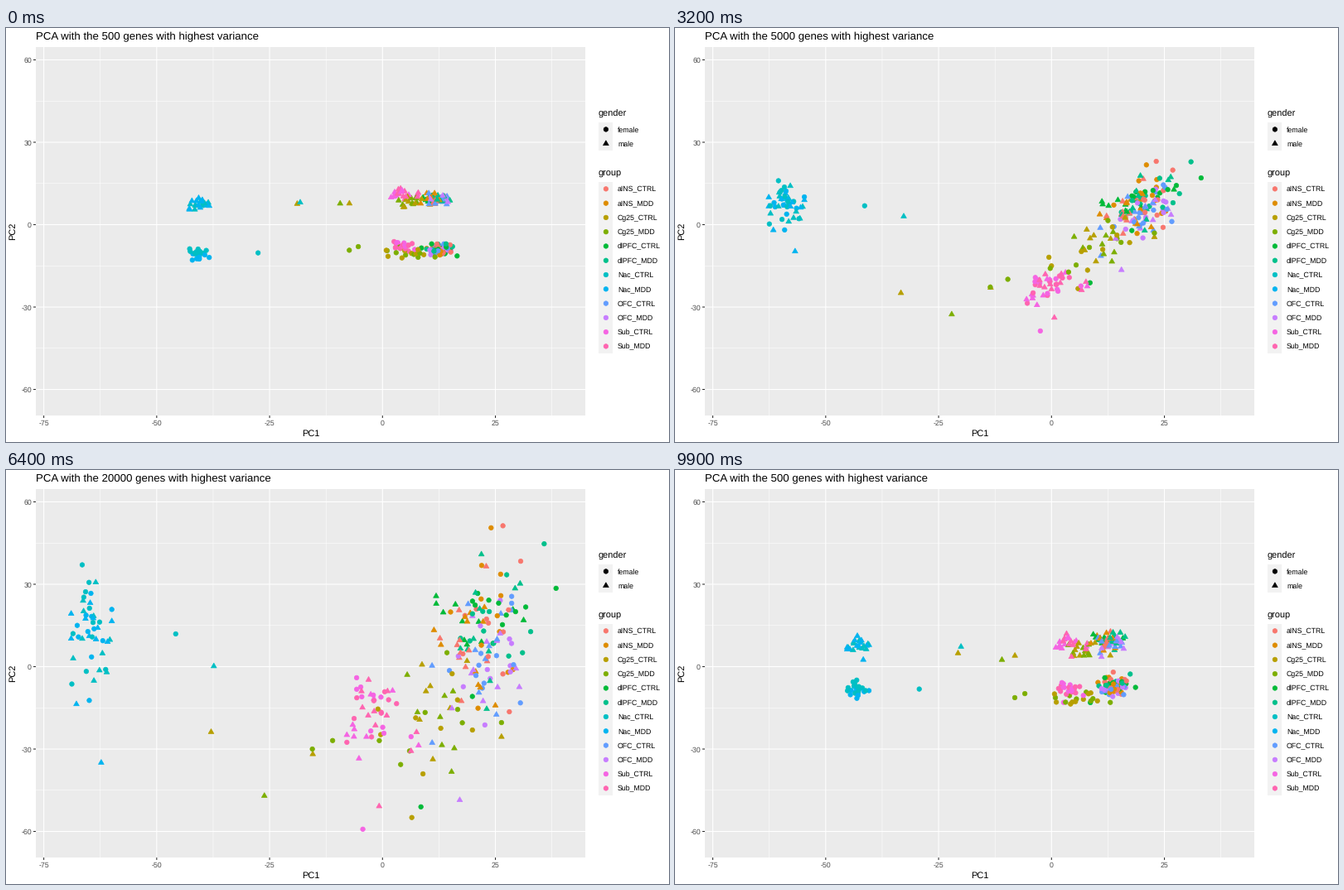
Animation of 800x500 px, one loop 10 s. Source, as a matplotlib script:

```python
import numpy as np
import matplotlib.pyplot as plt
from matplotlib.animation import FuncAnimation
from matplotlib.collections import PathCollection
from matplotlib.patches import Rectangle
from matplotlib.path import Path
from matplotlib.transforms import IdentityTransform

plt.rcParams["font.family"] = "Liberation Sans"
plt.rcParams["text.hinting"] = "none"
PX = 0.72  # points per pixel at 100 dpi
GENES = [500, 2000, 5000, 10000, 20000, 23971]
HOLD, MOVE = 5, 12  # frames a state rests, frames to the next one

COLORS = {
    "aINS_CTRL": "#F8766D", "aINS_MDD": "#DE8C00",
    "Cg25_CTRL": "#B79F00", "Cg25_MDD": "#7CAE00",
    "dlPFC_CTRL": "#00BA38", "dlPFC_MDD": "#00C08B",
    "Nac_CTRL": "#00BFC4", "Nac_MDD": "#00B4F0",
    "OFC_CTRL": "#619CFF", "OFC_MDD": "#C77CFF",
    "Sub_CTRL": "#F564E3", "Sub_MDD": "#FF64B0",
}

# Cloud of each region in the last state: samples per group and sex,
# centre x, y, spread x, y, and its lift in the first state
REGIONS = {
    "Nac": (11, -65.5, 9, 2.3, 13, -1.5),
    "Cg25": (8, 11, -17, 8, 14, -1),
    "Sub": (10, -2, -13, 5, 10, 1.7),
    "aINS": (11, 22, 9, 4.5, 17, 0),
    "dlPFC": (11, 24, 14, 5, 17, 0),
    "OFC": (11, 23, 3, 5, 15, 0),
}

# A few samples far from their cloud
LONERS = [
    ("Nac_CTRL", "F", -46.6, 13), ("Nac_CTRL", "M", -38.2, -0.8),
    ("Nac_CTRL", "F", -67.6, 42.5), ("Nac_MDD", "M", -63.3, -42),
    ("Cg25_CTRL", "M", -38.8, -22), ("Cg25_MDD", "M", -26.9, -49.5),
    ("Cg25_MDD", "F", -15.9, -31), ("Cg25_CTRL", "M", -15.8, -33.2),
    ("Cg25_MDD", "F", -11.3, -28), ("Cg25_CTRL", "F", 6.6, -63.3),
    ("Sub_CTRL", "F", -4.7, -63.3), ("Sub_MDD", "M", -1, -54),
    ("aINS_CTRL", "F", 27.3, 58.5), ("aINS_MDD", "F", 24.6, 58),
    ("dlPFC_CTRL", "F", 39.4, 31), ("dlPFC_CTRL", "F", 8.5, -59),
    ("dlPFC_MDD", "F", 36.7, 50), ("OFC_MDD", "M", 17.4, -57.3),
]

rng = np.random.default_rng(12)


def spread(n=None):
    return np.clip(rng.normal(size=n), -2, 2)


def px_x(x):
    return 454.3 + 5.4493 * x


def px_y(y):
    return 237.5 - 3.317 * y


def first_x(region, x):
    if region in ("Nac", "Cg25"):
        return np.interp(x, [-71, -57, -47, -38, -27, -14, 0, 28],
                         [-43.2, -36.5, -28, -18, -9.4, -7, 1.5, 12])
    if region == "Sub":
        return 4.5 + 0.35 * (x + 2) + 0.3 * spread()
    return 12 + 0.24 * (x - 22) + 0.7 * spread()


def states(group, sex, x, y):
    """Pixel position of one sample in each of the six states."""
    region = group.split("_")[0]
    side = 1 if sex == "M" else -1
    x1 = first_x(region, x)
    y1 = 9.2 * side + REGIONS[region][-1] + 1.1 * spread()
    tilt = 4 if region == "Nac" else np.clip(0.55 * (x - 15), -24, 10)
    if region == "Sub":
        tilt -= 14
    xs = x1 + (x - x1) * np.array([0, 0.46, 0.75, 0.89, 0.98, 1])
    ys = np.array([y1, -0.25 * y - 0.75 * tilt + 2.4 * side,
                   0.36 * y + 0.9 * tilt, 0.56 * y + 0.6 * tilt,
                   0.95 * y + 0.08 * tilt, y])
    return np.column_stack([px_x(xs), px_y(ys)])


def make_samples():
    samples = list(LONERS)
    for group in COLORS:
        region = group.split("_")[0]
        n, cx, cy, sx, sy, _ = REGIONS[region]
        cortex = cx > 20
        for sex in "FM":
            dx, dy = sx * spread(n), sy * spread(n)
            if cortex:  # rising cloud, females further right
                dy += 0.5 * dx
                dx += 2 if sex == "F" else -2
            samples += [(group, sex, cx + a, cy + b) for a, b in zip(dx, dy)]
    return [samples[i] for i in rng.permutation(len(samples))]


SHAPES = {
    "F": Path.circle((0, 0), 2.75),
    "M": Path([(0, 3.87), (3.35, -1.94), (-3.35, -1.94), (0, 3.87)], closed=True),
}

fig = plt.figure(figsize=(8, 5), dpi=100, facecolor="white")
ax = fig.add_axes([0, 0, 1, 1])
ax.set_xlim(0, 800)
ax.set_ylim(500, 0)
ax.axis("off")


def box(x0, y0, x1, y1, color):
    ax.add_patch(Rectangle((x0, y0), x1 - x0, y1 - y0, fc=color, lw=0, zorder=0))


def line(xs, ys, color, width):
    ax.plot(xs, ys, color=color, lw=width * PX, solid_capstyle="butt",
            snap=False, zorder=1)


def label(x, y, s, size, color="black", **kw):
    return ax.text(x, y, s, fontsize=size * PX, color=color, **kw)


def markers(sexes, colors, places):
    marks = PathCollection(
        [SHAPES[s] for s in sexes], sizes=None, offsets=places,
        offset_transform=ax.transData, facecolors=colors, edgecolors=colors,
        linewidths=0.7 * PX, transform=IdentityTransform(), zorder=3)
    ax.add_collection(marks, autolim=False)
    return marks


def draw_panel():
    box(36, 23, 699, 468, "#EBEBEB")
    for shift, width in ((0.5, 0.55), (0, 1.1)):
        for i in range(-3, 2):
            x = px_x(25 * (i + shift))
            line([x, x], [23, 468], "white", width)
        for i in range(-2, 3 if shift == 0 else 2):
            y = px_y(30 * (i + shift))
            line([36, 699], [y, y], "white", width)
    for v in range(-75, 26, 25):
        line([px_x(v)] * 2, [468, 471], "#333333", 1.07)
        label(px_x(v), 480, v, 8.8, "#4D4D4D", ha="center")
    for v in range(-60, 61, 30):
        line([33, 36], [px_y(v)] * 2, "#333333", 1.07)
        label(31, px_y(v) + 3.6, v, 8.8, "#4D4D4D", ha="right")
    label(367.5, 493, "PC1", 11, ha="center")
    label(13, 245.5, "PC2", 11, ha="right", va="center", rotation=90)


def draw_legend(title, baseline, top, items):
    """items: text, sex and colour of each key."""
    step = 17.28
    label(715, baseline, title, 11)
    box(715, top, 715 + step, top + step * len(items), "#F2F2F2")
    texts, sexes, colors = zip(*items)
    mids = [top + step * (i + 0.5) for i in range(len(items))]
    for y, text in zip(mids, texts):
        label(738, y + 3.2, text, 8.8)
    markers(sexes, colors, [(723.9, y) for y in mids])


draw_panel()
draw_legend("gender", 107, 113.8, [("female", "F", "black"), ("male", "M", "black")])
draw_legend("group", 179, 185.7, [(g, "F", c) for g, c in COLORS.items()])

samples = make_samples()
path = np.array([states(*s) for s in samples])  # sample, state, xy
dots = markers([s[1] for s in samples], [COLORS[s[0]] for s in samples], path[:, 0])
heading = label(36, 14, "", 13.2)


def draw(frame):
    state, step = divmod(frame, HOLD + MOVE)
    last = len(GENES) - 1
    # the way back to the first state is one frame shorter
    t = max(0, step - HOLD + 1) / (MOVE - (state == last))
    nxt = (state + 1) % len(GENES)
    dots.set_offsets((1 - t) * path[:, state] + t * path[:, nxt])
    count = GENES[nxt if t >= 0.5 else state]
    heading.set_text(f"PCA with the {count} genes with highest variance")
    return dots, heading


anim = FuncAnimation(fig, draw, frames=100, interval=100, repeat=True, blit=False)
plt.show()
```
